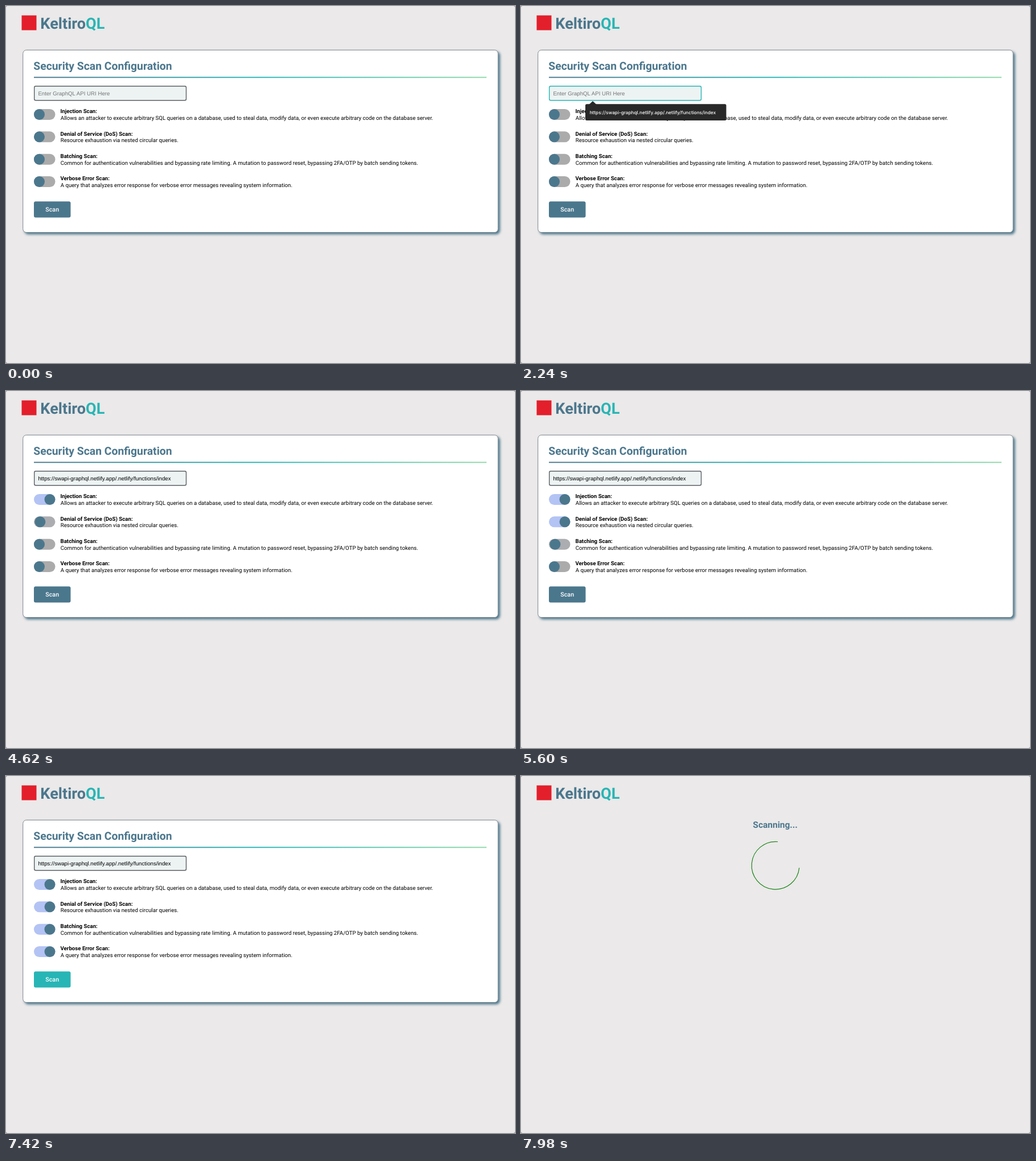
Animation, 894 px wide and 627 px high, one loop 8000 ms. Source, as an HTML page:

```html
<!DOCTYPE html>
<html lang="en">
<head>
<meta charset="utf-8">
<title>Security Scan</title>
<style>
  html, body { margin: 0; width: 100%; height: 100%; overflow: hidden; background: #999; }
  svg { display: block; width: 894px; height: 627px; background: #ebe9e9; border-radius: 3px; }
  text { font: 9.68px Roboto, sans-serif; text-rendering: geometricPrecision; white-space: pre; }
  .bold { font-weight: 700; }
  .brand { font-size: 27.1px; font-weight: 700; }
  .title { font-size: 19.35px; font-weight: 700; }
  .status { font-size: 15.5px; font-weight: 700; text-anchor: middle; }
  .button { font-size: 10.7px; font-weight: 500; text-anchor: middle; }
  .field { font-family: "Liberation Sans", Arial, sans-serif; }
  .tip { font: 500 8.16px Inter, sans-serif; }
  .card { filter: drop-shadow(3.5px 3.5px 2.2px #4b778d); }
</style>
</head>
<body>
<svg viewBox="0 0 894 627">
  <defs>
    <linearGradient id="rule">
      <stop stop-color="#4b778d"/>
      <stop offset=".5" stop-color="#28b5b5"/>
      <stop offset="1" stop-color="#8fd9a8"/>
    </linearGradient>
  </defs>

  <rect x="27.5" y="16.5" width="26" height="26" fill="#e31f2b"/>
  <text class="brand" x="60.3" y="39.5" fill="#4b778d">Keltiro<tspan fill="#28b5b5">QL</tspan></text>

  <g id="form">
    <rect class="card" x="29.8" y="77.4" width="834.4" height="320.2" rx="6" fill="#fff" stroke="#82898f"/>
    <text class="title" x="48.3" y="111.7" fill="#4b778d">Security Scan Configuration</text>
    <rect x="49" y="124.4" width="795" height="1.9" fill="url(#rule)"/>
    <rect id="input" x="49.7" y="140.7" width="266.8" height="25" rx="2.5" fill="#edf3f3" stroke-width="1.4"/>
    <text id="value" class="field" x="56.4" y="156.7"></text>
    <rect id="caret" y="148" width="1" height="11"/>
    <g id="rows"></g>
    <rect id="scan" x="49" y="343.2" width="64.5" height="28.4" rx="3"/>
    <text class="button" x="81.2" y="360.7" fill="#fff">Scan</text>
    <g id="tooltip">
      <path d="M119.5 173 126 167l6.5 6z" fill="#29292a"/>
      <rect x="113" y="172.3" width="247.5" height="28.7" rx="2.5" fill="#29292a"/>
      <text id="tip" class="tip" x="120.7" y="189.7" fill="#fff"></text>
    </g>
  </g>

  <g id="loading">
    <text class="status" x="446.6" y="91" fill="#4b778d">Scanning...</text>
    <path id="spinner" d="M-34.58 34.58A48.9 48.9 0 1 1 34.58 34.58" fill="none" stroke="#158515" stroke-width="1.4"/>
  </g>
</svg>

<script>
const LOOP = 8000, STEP = 70;
const URI = 'https://swapi-graphql.netlify.app/.netlify/functions/index';
const OPTIONS = [
  ['Injection Scan:', 'Allows an attacker to execute arbitrary SQL queries on a database, used to steal data, modify data, or even execute arbitrary code on the database server.', 3535],
  ['Denial of Service (DoS) Scan:', 'Resource exhaustion via nested circular queries.', 4585],
  ['Batching Scan:', 'Common for authentication vulnerabilities and bypassing rate limiting. A mutation to password reset, bypassing 2FA/OTP by batch sending tokens.', 5565],
  ['Verbose Error Scan:', 'A query that analyzes error response for verbose error messages revealing system information.', 6475],
];
const GREY = [171, 171, 171], LILAC = [179, 195, 244];
const BLUE = [75, 119, 141], TEAL = [40, 181, 181];

const $ = id => document.getElementById(id);
const set = (el, attrs) => { for (const k in attrs) el.setAttribute(k, attrs[k]); };
const show = (el, on) => { el.style.display = on ? '' : 'none'; };
const mix = (a, b, p) => `rgb(${a.map((v, i) => v + (b[i] - v) * p)})`;
const within = (t, from, to) => t >= from && t < to;

// CSS "ease", cubic-bezier(.25, .1, .25, 1)
function ease(x) {
  if (x <= 0) return 0;
  if (x >= 1) return 1;
  const bezier = (a, b, s) => 3 * a * s * (1 - s) ** 2 + 3 * b * s * s * (1 - s) + s ** 3;
  let lo = 0, hi = 1;
  for (let i = 0; i < 20; i++) {
    const mid = (lo + hi) / 2;
    if (bezier(.25, .25, mid) < x) lo = mid; else hi = mid;
  }
  return bezier(.1, 1, lo);
}

$('tip').textContent = URI;
$('rows').innerHTML = OPTIONS.map(([label, info], i) => `
  <g transform="translate(0 ${i * 39.35})">
    <rect x="49" y="181" width="37.5" height="19" rx="9.5"/>
    <circle cx="58.5" cy="190.5" r="9.5" fill="#4b778d"/>
    <text class="bold" x="95.5" y="188.4">${label}</text>
    <text x="95.7" y="200">${info}</text>
  </g>`).join('');
const toggles = [...$('rows').children];

function draw(t) {
  const scanning = t >= 7490;
  show($('form'), !scanning);
  show($('loading'), scanning);

  if (scanning) {
    const turn = 10 + (t - 7490) * .45;
    const scale = .8 + .2 * Math.abs(turn - 180) / 180;
    set($('spinner'), { transform: `translate(447 157.2) rotate(${turn}) scale(${scale})` });
    return;
  }

  const filled = t >= 2380;
  set($('input'), { stroke: within(t, 1750, 3430) ? '#28b5b5' : '#5c6164' });
  set($('value'), { fill: filled ? '#000' : '#757575' });
  $('value').textContent = filled ? URI : 'Enter GraphQL API URI Here';
  set($('caret'), { x: filled ? 289.5 : 57 });
  show($('caret'), within(t, 1750, 2240) || within(t, 2380, 2940));
  show($('tooltip'), within(t, 1750, 2380));
  set($('tooltip'), { opacity: t < 1820 ? .6 : 1 });

  toggles.forEach((row, i) => {
    const p = ease((t - OPTIONS[i][2]) / 400);
    set(row.children[0], { fill: mix(GREY, LILAC, p) });
    set(row.children[1], { cx: 58.5 + 18.5 * p });
  });
  set($('scan'), { fill: mix(BLUE, TEAL, ease((t - 6965) / 300)) });
}

function tick() {
  draw(Math.floor(performance.now() % LOOP / STEP) * STEP);
  requestAnimationFrame(tick);
}
tick();
</script>
</body>
</html>
```
